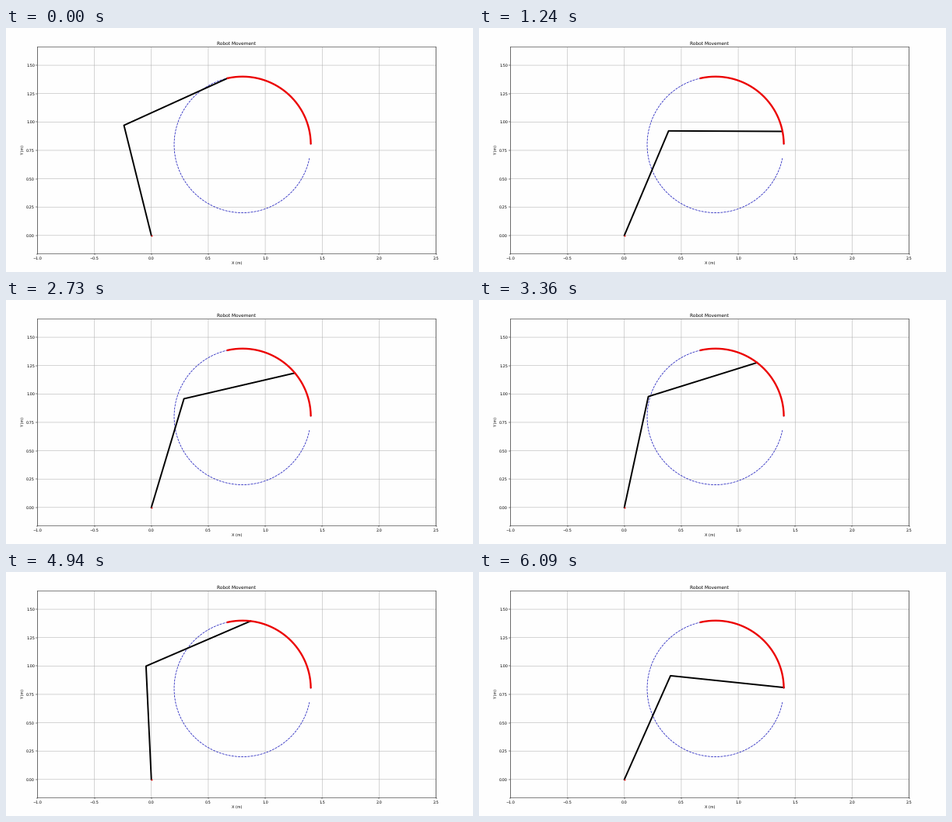
These frames come from a looping animation (600 by 315 pixels, 6120 ms). A matplotlib script:

```python
import numpy as np
import matplotlib.pyplot as plt
from matplotlib.animation import FuncAnimation

W, H, DPI = 600, 315, 35
FRAMES, INTERVAL = 204, 30
STEP_MS = 30.3          # pace of the simulated motion
LAST = 200              # step at which the arm reaches the end of its path
CENTER, RADIUS = np.array([0.8, 0.8]), 0.6
PAPER, RED, BLUE = "#fefefe", "#ec0000", "#1a1abc"

# Unsnapped lines keep their exact sub-pixel positions
plt.rcParams.update({"font.family": "DejaVu Sans", "text.hinting": "none",
                     "path.snap": False})

# Angular speed in degrees per step, integrated to the angle on the circle
steps = np.linspace(1, LAST, 1991)
speed = np.interp(steps, [1, 45, 110, 140, 163, 200],
                  [0, 0.565, 0.615, 0.60, 0.56, 0.48])
angles = 1 + np.concatenate(
    ([0], np.cumsum((speed[1:] + speed[:-1]) / 2 * np.diff(steps))))


def on_circle(deg):
    a = np.radians(deg)
    return CENTER[0] + RADIUS * np.cos(a), CENTER[1] + RADIUS * np.sin(a)


def arm_points(deg):
    """Base, elbow and tip of two unit links reaching the circle."""
    x, y = on_circle(deg)
    shoulder = np.arctan2(y, x) + np.arccos(np.hypot(x, y) / 2)
    return [0, np.cos(shoulder), x], [0, np.sin(shoulder), y]


def angle_at(frame):
    step = (frame * INTERVAL + 10) / STEP_MS
    if step < 1:
        return angles[-1]
    if step > LAST + 1:
        return angles[0]
    return np.interp(step, steps, angles)


fig = plt.figure(figsize=(W / DPI, H / DPI), dpi=DPI, facecolor=PAPER)
left, right, top, bottom = 40.4, 552.6, 24.5, 291.4
ax = fig.add_axes([left / W, 1 - bottom / H,
                   (right - left) / W, (bottom - top) / H], facecolor=PAPER)
ax.set_xlim(-1, 2.5)
ax.set_ylim(-0.161, 1.661)
ax.set_xticks(np.arange(-1, 2.6, 0.5))
ax.set_yticks(np.arange(0, 1.6, 0.25))
ax.set_title("Robot Movement")
ax.set_xlabel("X (m)")
ax.set_ylabel("Y (m)")
ax.set_axisbelow(True)
ax.grid(True, lw=1.1, color="#b0b0b0")
ax.tick_params(width=1)
for spine in ax.spines.values():
    spine.set_linewidth(1)

ax.plot(*on_circle(np.linspace(0, 348.5, 300)), "--", color=BLUE, lw=1.6)
arm, = ax.plot([], [], color="black", lw=4, zorder=3)
ax.plot(*on_circle(np.linspace(angles[0], angles[-1], 200)),
        color=RED, lw=4.8, zorder=4)
ax.plot(0, 0, "o", color=RED, ms=4, mew=0, zorder=4)


def update(frame):
    arm.set_data(*arm_points(angle_at(frame)))
    return arm,


anim = FuncAnimation(fig, update, frames=FRAMES, interval=INTERVAL,
                     repeat=True, repeat_delay=0, blit=False)
plt.show()
```
